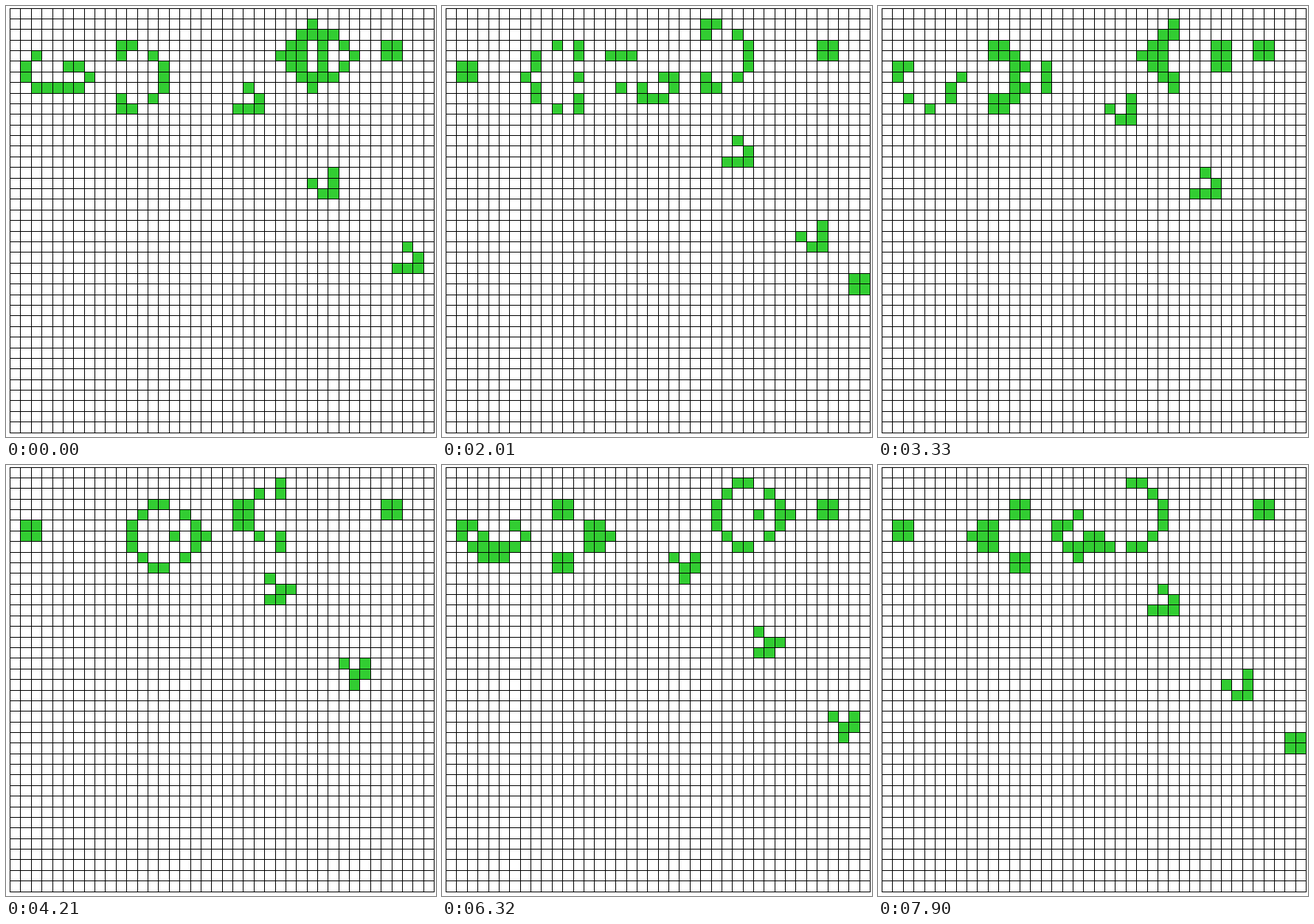
Recreate the animation shown at these times as a matplotlib script. Size 583x584 px, loop 7.99 s.

```python
"""Conway's Game of Life: a glider gun firing into the edge of a 40 x 40 board."""
import matplotlib.pyplot as plt
import numpy as np
from matplotlib.animation import FuncAnimation
from matplotlib.collections import PolyCollection

WIDTH, HEIGHT, DPI = 583, 584, 64
CELLS, PITCH = 40, 14.375
LOOP_MS, INTERVAL_MS = 7990, 17

# The clock ticks evenly; the board skips a generation on each rest.
TICKS = 91
TICK_MS = LOOP_MS / TICKS
LEAD_MS = 12
RESTS = np.array([5, 12, 18, 24, 30, 37, 43, 50, 57, 63, 71, 76, 85, 89])

# The gun alone; three of its 30-generation periods put three gliders in flight.
WARM_UP = 90
GUN = [  # column, row, rows of cells
    (1, 4, ".O..... O...OO. O.....O .OOOOO."),
    (10, 3, "OO O..O ....O ....O ....O O..O OO"),
    (25, 1, "...O ..OOOO .OO.O.O OOO.O..O .OO.O.O ..OOOO ...O"),
    (35, 3, "OO OO"),
]


def gun_board():
    board = np.zeros((CELLS, CELLS), dtype=int)
    for col, row, pattern in GUN:
        for dy, line in enumerate(pattern.split()):
            for dx, mark in enumerate(line):
                board[row + dy, col + dx] = mark == "O"
    return board


def next_board(board):
    """One generation; everything beyond the edge is dead."""
    padded = np.pad(board, 1)
    block = sum(padded[dy:dy + CELLS, dx:dx + CELLS]
                for dy in range(3) for dx in range(3))
    return ((block == 3) | ((block == 4) & (board == 1))).astype(int)


def grid_lines(start):
    """Whole-pixel line positions; exact halves round up only near the middle."""
    k = np.arange(CELLS + 1)
    return np.round(start + PITCH * k + 0.001 * (6 - abs(k - 21)))


def rect(x0, y0, x1, y1):
    return [(x0, y0), (x1, y0), (x1, y1), (x0, y1)]


def cell_rects(board):
    return [rect(xs[c], ys[r], xs[c + 1], ys[r + 1])
            for r, c in np.argwhere(board)]


def grid_rects():
    left, right, top, bottom = xs[0], xs[-1] + 1, ys[0], ys[-1] + 1
    return ([rect(x, top, x + 1, bottom) for x in xs]
            + [rect(left, y, right, y + 1) for y in ys])


xs, ys = grid_lines(5.125), grid_lines(2.625)

boards = [gun_board()]
for _ in range(WARM_UP + TICKS):
    boards.append(next_board(boards[-1]))
generations = [cell_rects(board) for board in boards[WARM_UP:]]

fig = plt.figure(figsize=(WIDTH / DPI, HEIGHT / DPI), dpi=DPI, facecolor="white")
ax = fig.add_axes([0, 0, 1, 1])
ax.set_xlim(0, WIDTH)
ax.set_ylim(HEIGHT, 0)
ax.axis("off")

flat = dict(edgecolors="none", linewidths=0, antialiased=False)
cells = PolyCollection(generations[0], facecolors="limegreen", zorder=1, **flat)
grid = PolyCollection(grid_rects(), facecolors="black", zorder=2, **flat)
ax.add_collection(cells, autolim=False)
ax.add_collection(grid, autolim=False)


def draw(frame):
    now = (frame + 1) * INTERVAL_MS + LEAD_MS
    tick = min(int(now / TICK_MS), TICKS - 1)
    cells.set_verts(generations[tick - np.sum(RESTS <= tick)])
    return [cells]


animation = FuncAnimation(fig, draw, frames=LOOP_MS // INTERVAL_MS,
                          interval=INTERVAL_MS, repeat=True, repeat_delay=0)
plt.show()
```
